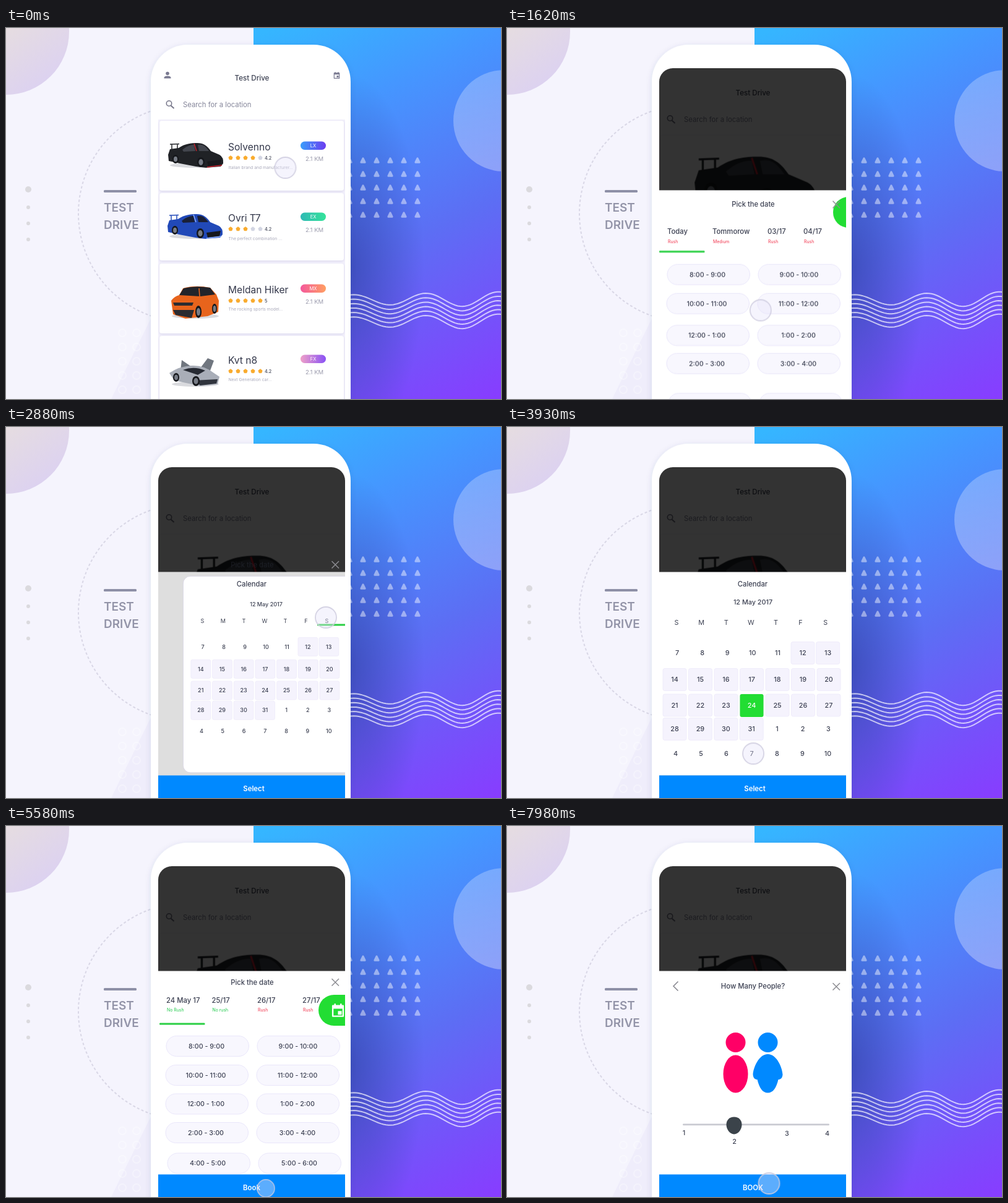
These frames come from a looping animation (800x600 px, 8 s). An HTML page:

```html
<!DOCTYPE html>
<html lang="en">
<head>
<meta charset="utf-8">
<title>Test Drive</title>
<style>
html,body{margin:0;width:100%;height:100%;overflow:hidden;background:#f5f4fd}
svg{display:block;width:100vw;height:100vh;font-family:Inter,"Open Sans",sans-serif}
svg *{animation-duration:8s;animation-iteration-count:infinite;animation-timing-function:ease-in-out}

/* list to detail */
#icons{animation-name:icons}
@keyframes icons{0%,3%{opacity:1}7%,100%{opacity:0}}
#app{animation-name:app}
@keyframes app{0%,15.6%{transform:none}19.6%,100%{transform:translateY(24px)}}
#others{animation-name:others}
@keyframes others{0%,3.1%{transform:none}9%,100%{transform:translateY(350px)}}
#card{animation-name:card}
@keyframes card{0%,3.1%{height:113px}9%,100%{height:400px}}
#hero{animation-name:hero}
@keyframes hero{0%,3.1%{transform:translate(261px,186px)}9%,100%{transform:translate(301px,184px) scale(2.2)}}
#info{animation-name:info}
@keyframes info{0%,3.1%{transform:none}9%,100%{transform:translate(-60px,130px)}}
#tag{animation-name:tag}
@keyframes tag{0%,3.1%{transform:none}9%,100%{transform:translateY(130px)}}
#detailBar{animation-name:detailBar}
@keyframes detailBar{0%,6%{transform:translateY(40px)}10%,100%{transform:none}}

/* sheet */
#shade{animation-name:shade}
@keyframes shade{0%,15.6%{opacity:0}19.4%,100%{opacity:.8}}
#sheet{animation-name:sheet}
@keyframes sheet{0%,15.6%{transform:translateY(370px)}20.25%{transform:translateY(28px);animation-timing-function:ease-out}23%,100%{transform:none}}
.rise{animation-name:rise}
@keyframes rise{0%,15.6%{transform:translateY(calc(var(--d)*3))}20.25%{transform:translateY(var(--d));animation-timing-function:ease-out}23%,100%{transform:none}}
#pick{animation-name:pick}
@keyframes pick{0%,30.6%{transform:none;opacity:1}36%{transform:translateY(-30px);opacity:.3}39%,54%{transform:translateY(-30px);opacity:0}59%,70%{transform:none;opacity:1}73%,100%{transform:translateY(7px);opacity:0}}
#close{animation-name:close}
@keyframes close{0%,30.6%{transform:none;opacity:1}36%{transform:translateY(-30px);opacity:1}39%,54%{transform:translateY(-30px);opacity:0}59%,70%{transform:none;opacity:1}74%,100%{transform:translateY(7px);opacity:1}}
#slots{animation-name:slots}
@keyframes slots{0%,30.6%{transform:none;opacity:1}34.5%,53%{transform:none;opacity:0}59%,70%{transform:none;opacity:1}76%,100%{transform:translateX(-310px);opacity:1}}
#firstTabs{animation-name:firstTabs}
@keyframes firstTabs{0%,30.6%{transform:none;opacity:1}35%,100%{transform:translateX(256px);opacity:0}}
#nextTabs{animation-name:nextTabs}
@keyframes nextTabs{0%,54%{transform:translateX(310px)}62.6%{transform:translateX(18px)}67%,70%{transform:none}76%,100%{transform:translateX(-310px)}}
#line{animation-name:line}
@keyframes line{0%,30.6%{transform:none;animation-timing-function:ease-in}36%{transform:translateX(257px);animation-timing-function:ease-out}39%,54%{transform:translateX(310px)}61%,70%{transform:translateX(2px)}76%,100%{transform:translateX(-310px)}}
#dateButton{animation-name:dateButton}
@keyframes dateButton{0%,18.5%{transform:translateX(50px)}20.25%{transform:translateX(22px);animation-timing-function:ease-out}24%,31%{transform:none}35%,55%{transform:translateX(50px)}61%,70%{transform:none}74%,100%{transform:translateX(50px)}}

/* calendar */
#dim{animation-name:dim}
@keyframes dim{0%,30.6%{opacity:0}35%,53.1%{opacity:.13}58%,100%{opacity:0}}
#calendar{animation-name:calendar;transform-origin:538px 304px}
@keyframes calendar{0%,31%{transform:scale(0);animation-timing-function:ease-in}36%{transform:scale(.835);animation-timing-function:ease-out}39.4%,53.1%{transform:none}58.75%,100%{transform:scale(0)}}
#calTitle{animation-name:calTitle}
@keyframes calTitle{0%,32%{opacity:0}35.5%,53.5%{opacity:1}56%,100%{opacity:0}}
#chosen{animation-name:chosen}
@keyframes chosen{0%,44.2%{opacity:0}45.5%,100%{opacity:1}}
#book{animation-name:book}
@keyframes book{0%,31%{opacity:1}33.5%,54%{opacity:0}57%,72%{opacity:1}74%,100%{opacity:0}}
#select{animation-name:select}
@keyframes select{0%,32%{opacity:0}34.5%,53.5%{opacity:1}56%,100%{opacity:0}}
#bookCaps{animation-name:bookCaps}
@keyframes bookCaps{0%,72%{opacity:0}74%,100%{opacity:1}}

/* people */
#howMany{animation-name:howMany}
@keyframes howMany{0%,72%{opacity:0}76%,100%{opacity:1}}
#people{animation-name:people}
@keyframes people{0%,76.5%{transform:translateX(320px);animation-timing-function:ease-in}81%{transform:translateX(173px);animation-timing-function:ease-out}87%,100%{transform:none}}
#man{animation-name:man}
@keyframes man{0%,91.25%{transform:translateX(-24px)}95.6%,100%{transform:none}}
#woman{animation-name:woman;transform-origin:369.5px 385px}
@keyframes woman{0%,92%{transform:scale(0)}96%,100%{transform:none}}
#knob{animation-name:knob}
@keyframes knob{0%,91.25%{transform:translateX(286.5px)}95.6%,100%{transform:translateX(367px)}}
#one{animation-name:one}
@keyframes one{0%,91.25%{transform:translateY(11px)}95%,100%{transform:none}}
#two{animation-name:two}
@keyframes two{0%,91.25%{transform:none}95.6%,100%{transform:translateY(13px)}}

/* touch */
#touch{animation-name:touch}
@keyframes touch{
0%,5%{transform:translate(451.5px,226px)}
14%,15.6%{transform:translate(400px,578px);animation-timing-function:ease-in}
20.25%{transform:translate(409.5px,457px);animation-timing-function:ease-out}
27%,31%{transform:translate(517px,298px)}
36%{transform:translate(517px,308px)}
43%,45.5%{transform:translate(395px,450px);animation-timing-function:ease-in}
49.1%{transform:translate(398px,527px);animation-timing-function:ease-out}
52%,54.5%{transform:translate(400px,580px)}
62.6%{transform:translate(517px,588px)}
68%,71%{transform:translate(420px,586px)}
81%{transform:translate(471.5px,584px)}
90%,91.25%{transform:translate(294px,484px)}
95.6%{transform:translate(374px,486px)}
99.75%,100%{transform:translate(423.5px,578px)}}
#tap{animation-name:tap}
@keyframes tap{0%,1%{transform:none}2%{transform:scale(.8)}3.1%,14.4%{transform:none}15.2%{transform:scale(.8)}16%,28.5%{transform:none}29.5%{transform:scale(.8)}30.5%,43.2%{transform:none}44.2%{transform:scale(.8)}45.2%,52%{transform:none}53%{transform:scale(.8)}54%,68.5%{transform:none}69.5%{transform:scale(.8)}70.5%,100%{transform:none}}
</style>
</head>
<body>
<script>
const INK = '#3c4052', BLUE = '#0089ff', GREEN = '#22dd33', RED = '#f0334c';

const text = (x, y, str, size, fill = INK, anchor = 'start', weight = 400, extra = '') =>
  `<text x="${x}" y="${y + size * .36}" font-size="${size}" fill="${fill}" text-anchor="${anchor}" font-weight="${weight}" ${extra}>${str}</text>`;
const mid = (x, y, str, size = 11.2, fill = INK, weight = 500, extra = '') =>
  text(x, y, str, size, fill, 'middle', weight, extra);
const rect = (x, y, w, h, rx, fill, extra = '') =>
  `<rect x="${x}" y="${y}" width="${w}" height="${h}" rx="${rx}" fill="${fill}" ${extra}/>`;
const path = (d, fill = 'none', extra = '') => `<path d="${d}" fill="${fill}" ${extra}/>`;
const disc = (x, y, r, fill, extra = '') => `<circle cx="${x}" cy="${y}" r="${r}" fill="${fill}" ${extra}/>`;
const oval = (x, y, rx, ry, fill) => `<ellipse cx="${x}" cy="${y}" rx="${rx}" ry="${ry}" fill="${fill}"/>`;
const group = (id, body) => `<g id="${id}">${body}</g>`;
const rise = (d, body) => `<g class="rise" style="--d:${d}px">${body}</g>`;
const list = (n, fn) => Array.from({length: n}, (_, i) => fn(i)).join('');
const gradient = (id, from, to) =>
  `<linearGradient id="${id}"><stop stop-color="${from}"/><stop offset="1" stop-color="${to}"/></linearGradient>`;

const defs = `<defs>
  <linearGradient id="sky" gradientUnits="userSpaceOnUse" x1="430" y1="0" x2="740" y2="630">
    <stop stop-color="#35b6ff"/><stop offset=".24" stop-color="#4596ff"/><stop offset=".58" stop-color="#5c6ef4"/><stop offset="1" stop-color="#883cff"/>
  </linearGradient>
  <radialGradient id="dusk"><stop stop-color="#2c3a9c" stop-opacity=".6"/><stop offset="1" stop-color="#2c3a9c" stop-opacity="0"/></radialGradient>
  <linearGradient id="corner" x1=".5" y1=".45" x2=".9" y2="1"><stop stop-color="#e6dde0"/><stop offset="1" stop-color="#dacff4"/></linearGradient>
  <linearGradient id="haze" x2="0" y2="1"><stop stop-color="#fff" stop-opacity=".25"/><stop offset="1" stop-color="#fff" stop-opacity=".32"/></linearGradient>
  ${gradient('b0', '#3a9dfb', '#6b3df0')}${gradient('b1', '#2fb9b4', '#35e39a')}
  ${gradient('b2', '#f4589c', '#ff9f62')}${gradient('b3', '#efa0c8', '#8a52f5')}
  <filter id="soft" x="-20%" y="-10%" width="140%" height="120%"><feDropShadow dx="0" dy="2" stdDeviation="5" flood-color="#3b3f7a" flood-opacity=".13"/></filter>
  <filter id="lift" x="-5%" y="-10%" width="110%" height="125%"><feDropShadow dx="0" dy="1" stdDeviation="1.5" flood-color="#6a62a8" flood-opacity=".2"/></filter>
  <clipPath id="screen"><rect x="246" y="65" width="302" height="560" rx="22"/></clipPath>
  <clipPath id="below"><rect x="246" y="235" width="302" height="328"/></clipPath>
</defs>`;

// The swell grows a little towards the right.
function wave(k) {
  let d = '';
  for (let x = 550; x <= 802; x += 4) {
    const swell = 10 + (x - 678) / 50;
    d += (d ? 'L' : 'M') + x + ' ' + (439 + 7.2 * k - swell * Math.cos((x - 678) * Math.PI * 2 / 117)).toFixed(1);
  }
  return path(d, 'none', 'stroke="#fff" stroke-opacity=".68" stroke-width="2"');
}

const backdrop =
  rect(0, 0, 800, 600, 0, '#f5f4fd') +
  disc(0, 6, 102, 'url(#corner)') +
  disc(292.5, 300, 175.5, 'none', 'stroke="#d9d7e6" stroke-width="2" stroke-dasharray="4 3.4"') +
  path('M234 470 170 600H234Z', '#efedfb') +
  list(10, i => disc(188 + i % 2 * 23, 493 + (i >> 1) * 23, 6, 'none', 'stroke="#fff" stroke-opacity=".35" stroke-width="2"')) +
  disc(36, 261, 5, '#dbdade') + list(3, i => disc(36, 290 + i * 26, 3, '#dbdade')) +
  rect(158, 262, 53, 4, 1.5, '#8e90a7') +
  text(158, 290.2, 'TEST', 19, '#9394a8', 'start', 600) + text(158, 318.2, 'DRIVE', 19, '#9394a8', 'start', 600) +
  rect(400, 0, 400, 600, 0, 'url(#sky)') +
  oval(556, 385, 120, 310, 'url(#dusk)') +
  disc(805, 150, 82, 'url(#haze)') +
  list(30, i => {
    const x = 555 + i % 6 * 22, y = 214 + Math.floor(i / 6) * 22;
    return path(`M${x} ${y - 3}L${x + 3} ${y + 3.2}H${x - 3}Z`, '#fff', 'stroke="#fff" stroke-width="3.2" stroke-linejoin="round" opacity=".46"');
  }) +
  list(6, wave) +
  rect(234, 27, 323, 640, 60, '#fff', 'filter="url(#soft)"');

// Cars
const wheels = (...spots) => spots.map(([x, y, rx, ry]) => oval(x, y, rx, ry, '#15171b') + oval(x, y, rx * .6, ry * .62, '#777c86')).join('');
const sport = (body, glass, trim) =>
  oval(46, 36, 42, 4, '#d9dade') +
  path('M1 19 4 10 18 8C28 1 38 0 48 0 58 0 64 4 70 13L84 19Q91 23 90 33L86 38 62 40 46 38 20 33 2 29Z', body) +
  path('M24 11C32 4 38 3 43 3L45 13 26 14ZM49 3C56 2 60 3 67 13L51 13Z', glass) +
  path('M4 2 19 1.5M7 2V11M16 2V9', 'none', `stroke="${body}" stroke-width="1.5"`) +
  path('M64 30 87 27 85 36 66 38Z', '#17181c') +
  path('M43 1 47 13M64 39 88 36', 'none', `stroke="${trim}" stroke-width="1.4"`) +
  wheels([13, 26, 5, 7], [54, 31, 6, 8]);
const suv =
  oval(40, 49, 38, 4, '#d9dade') +
  path('M1 24Q6 17 14 15L20 4Q40-2 64 3L74 14 78 24 77 42 60 49 24 53 4 46Z', '#e8641c') +
  path('M14 15 21 4Q40-1 64 3L72 14 48 17Z', '#22242a') +
  path('M46 4 47 17', 'none', 'stroke="#e8641c" stroke-width="1.6"') +
  path('M4 27H37L35 32H6ZM4 39H38L34 52 8 47Z', '#2b2c31') + wheels([45, 42, 5, 10], [71, 37, 4, 8]);
const coupe =
  oval(42, 42, 38, 4, '#d9dade') +
  path('M18 20 20 3 36 14ZM50 16 62 0 72 4 66 20Z', '#70767f') +
  path('M0 24Q16 13 36 12 56 11 72 24L81 30 78 42 50 45 8 36Z', '#a9aeb8') +
  path('M22 19Q40 12 58 20L46 27Z', '#262a33') + path('M40 36 78 34 76 41 50 44Z', '#30343d') +
  wheels([11, 31, 5, 7], [43, 37, 6, 8]);

const star = (x, y, on) =>
  path('M' + [0, 1, 2, 3, 4].map(i => {
    const a = i * Math.PI * .4 - Math.PI / 2;
    return (x + 3.3 * Math.cos(a)).toFixed(1) + ' ' + (y + 3.3 * Math.sin(a)).toFixed(1);
  }).join('L') + 'Z', on ? '#f9ab2d' : '#d2d5e2', `stroke="${on ? '#f9ab2d' : '#d2d5e2'}" stroke-linejoin="round"`);

const about = (dy, name, stars, score, blurb, blurbY) =>
  text(359, 192 + dy, name, 15.6, '#33374a') +
  list(5, i => star(363 + i * 12, 210 + dy, i < stars)) +
  text(418, 210 + dy, score, 7.2, INK, 'start', 500) +
  text(359.5, blurbY, blurb, 6.8, '#a9a9ba');
const badge = (i, dy, label) =>
  rect(476, 183.5 + dy, 41, 13.5, 6.7, `url(#b${i})`) + mid(496.5, 190.3 + dy, label, 7.6, '#fff', 400) +
  mid(498.5, 211.5 + dy, '2.1 KM', 9.5, '#9b9bad', 400);
const cardBox = (y, h, id = '') => rect(248, y, 298, h, 4, '#fff', `${id} filter="url(#lift)"`);
const at = (x, y, body) => `<g transform="translate(${x} ${y})">${body}</g>`;

const calendarIcon = (x, y, s, fill) =>
  `<g transform="translate(${x} ${y}) scale(${s})">` +
  path('M-7-6H7V8H-7Z', 'none', `stroke="${fill}" stroke-width="2" stroke-linejoin="round"`) +
  path('M-7-6H7V-2H-7ZM-5-9H-3V-6H-5ZM3-9H5V-6H3ZM0 1H5V6H0Z', fill) + '</g>';

const app = group('app',
  group('icons', disc(261, 73.5, 2.8, '#7a7a91') + path('M255.5 81.5V80Q256 77.5 261 77.5T266.5 80V81.5Z', '#7a7a91') + calendarIcon(534.5, 76.5, .6, '#7a7a91')) +
  mid(397.5, 81, 'Test Drive', 11.6) +
  disc(263.5, 122, 4.2, 'none', 'stroke="#77778a" stroke-width="1.6"') + path('M266.5 125.5 271.5 130', 'none', 'stroke="#77778a" stroke-width="2"') +
  text(286, 124, 'Search for a location', 11.3, '#85869a') +
  group('others',
    rect(246, 148, 302, 480, 0, '#f2f0fb') +
    cardBox(267, 109) + at(260, 301, sport('#2149b8', '#1a2036', '#8fb2ff')) + about(115, 'Ovri T7', 3, '4.2', 'The perfect combination ...', 341) + badge(1, 115, 'EX') +
    cardBox(381, 113) + at(266, 417, suv) + about(231, 'Meldan Hiker', 5, '5', 'The rocking sports model...', 454.5) + badge(2, 231, 'MX') +
    cardBox(498, 130) + at(264, 534, coupe) + about(345, 'Kvt n8', 5, '4.2', 'Next Generation car...', 568.5) + badge(3, 345, 'FX')) +
  cardBox(150, 113, 'id="card"') +
  group('hero', sport('#202226', '#43464e', '#c8202c')) +
  group('info', about(0, 'Solvenno', 4, '4.2', 'Italian brand and manufacturer...', 226)) +
  group('tag', badge(0, 0, 'LX')));

// Sheet
const tabs = items => items.map(([x, day, load, color]) => text(x, 281.5, day, 11.3, INK, 'start', 500) + text(x + 1, 298, load, 6.9, color)).join('');
const slot = (x, y, from, to) =>
  rect(x, y - 16.5, 133.5, 33, 16.5, '#f8f7fe', 'stroke="#e9e6fa"') + mid(x + 66 - (x > 400 ? 0 : 1), y, `${from}:00 - ${to}:00`, 10.7);
const hour = h => (h - 1) % 12 + 1;
const rows = [[356, 0, 15], [403, -1, 15], [449.5, -1, 20], [496, -1, 19], [545.5, 2, 34]].map(([y, dx, d], i) => {
  const h = 8 + i * 2;
  return rise(d, slot(259 + dx, y, hour(h), hour(h + 1)) + slot(406 + dx, y, hour(h + 1), hour(h + 2)));
}).join('');

const cell = (x, y) => rect(x - 19, y - 18, 38, 36, 3, '#f5f3fd', 'stroke="#ece9fa" stroke-width=".8"');
const weeks = [[365.5, 275, 40.6], [408.5, 271, 41.5], [450, 271, 41.5], [488.5, 271, 41.4], [528, 272.5, 41]];
const days = weeks.map(([y, x0, step], w) => list(7, i => {
  const day = 7 + w * 7 + i, x = x0 + i * step;
  return (day > 11 && day < 32 ? cell(x, y) : '') + mid(x, y, day > 31 ? day - 31 : day, 10.8);
})).join('');
const calendar = group('calendar',
  rect(237, 229, 340, 380, 14, '#fff', 'stroke="#d5d2e4"') +
  mid(397.5, 283, '12 May 2017', 10.8) +
  list(7, i => mid(274 + i * 40.1, 316, 'SMTWTFS'[i], 10.8, INK, 400)) + days +
  group('chosen', rect(376.5, 432, 38, 37, 3, GREEN) + mid(395.5, 450, '24', 10.8, '#fff')));

const label = (id, x, str) => mid(x, 584.5, str, 11.4, '#fff', 600, `id="${id}"`);

const people = group('people',
  group('woman', disc(369.5, 350, 16, '#ff0066') + oval(369.5, 401, 20, 30.5, '#ff0066')) +
  group('man', disc(421.5, 350, 16, BLUE) +
    path('M421.5 369C436 369 445 391 445.5 402 445 408 442 410 438.5 410 435 424 430 431.5 421.5 431.5S408 424 404.5 410C401 410 398 408 397.5 402 398 391 407 369 421.5 369Z', BLUE)) +
  rect(284, 481.5, 237, 2.8, 1.4, '#c9cad1') +
  group('one', mid(286, 496.5, '1', 10.8)) + group('two', mid(367.5, 497.5, '2', 10.8)) +
  mid(452.5, 497.5, '3', 10.8) + mid(517.5, 497.5, '4', 10.8) +
  group('knob', path('M0 470.5C8 470.5 12.5 476 12.5 483S7 498.5 0 498.5-12.5 490-12.5 483-8 470.5 0 470.5Z', '#3b434a')));

const sheet = group('sheet',
  rect(246, 234.5, 302, 400, 0, '#fff') +
  group('slots', rows) +
  rise(20, group('firstTabs', tabs([[259, 'Today', 'Rush', RED], [332, 'Tommorow', 'Medium', RED], [421, '03/17', 'Rush', RED], [479, '04/17', 'Rush', RED]])) +
    group('nextTabs', tabs([[259, '24 May 17', 'No Rush', '#1fc94a'], [332.5, '25/17', 'No rush', '#1fc94a'], [406, '26/17', 'Rush', RED], [479, '27/17', 'Rush', RED]]))) +
  rect(246, 235, 302, 330, 0, '#000', 'id="dim"') +
  `<g clip-path="url(#below)">${calendar}</g>` +
  mid(397, 254, 'Calendar', 11.2, INK, 500, 'id="calTitle"') +
  rise(14, group('line', rect(246, 318.5, 73.5, 3, 1.2, '#2bcf44'))) +
  people +
  group('howMany', mid(397.5, 258.5, 'How Many People?', 11.3) + path('M276.5 251.5 269 259 276.5 266.5', 'none', 'stroke="#85858d" stroke-width="1.5"')) +
  rise(20, rect(246, 563.5, 302, 60, 0, BLUE) + label('book', 397, 'Book') + label('select', 400.5, 'Select') + label('bookCaps', 397.5, 'BOOK')));

const header = rise(5, group('pick', mid(398, 252.5, 'Pick the date')) +
  group('close', path('M526.5 247 538 258.5M538 247 526.5 258.5', 'none', 'stroke="#8c8c92" stroke-width="1.5"')));

document.body.innerHTML = `<svg viewBox="0 0 800 600">${defs}${backdrop}
  <g clip-path="url(#screen)">
    ${app}
    ${group('detailBar', rect(246, 563.5, 302, 40, 0, BLUE) + mid(397, 584.5, 'Book', 11.4, '#fff', 600))}
    ${rect(246, 65, 302, 560, 0, '#000', 'id="shade"')}
    ${sheet}
    ${group('dateButton', path('M560 273H530A25 25 0 0 0 530 323H560Z', GREEN) + calendarIcon(536.5, 298, 1.2, '#fff'))}
    <g style="animation-name:sheet">${header}</g>
    ${group('touch', group('tap', disc(0, 0, 17, '#e6e3fa', 'fill-opacity=".4" stroke="#cfcde0" stroke-opacity=".85" stroke-width="1.8"')))}
  </g></svg>`;
</script>
</body>
</html>
```
